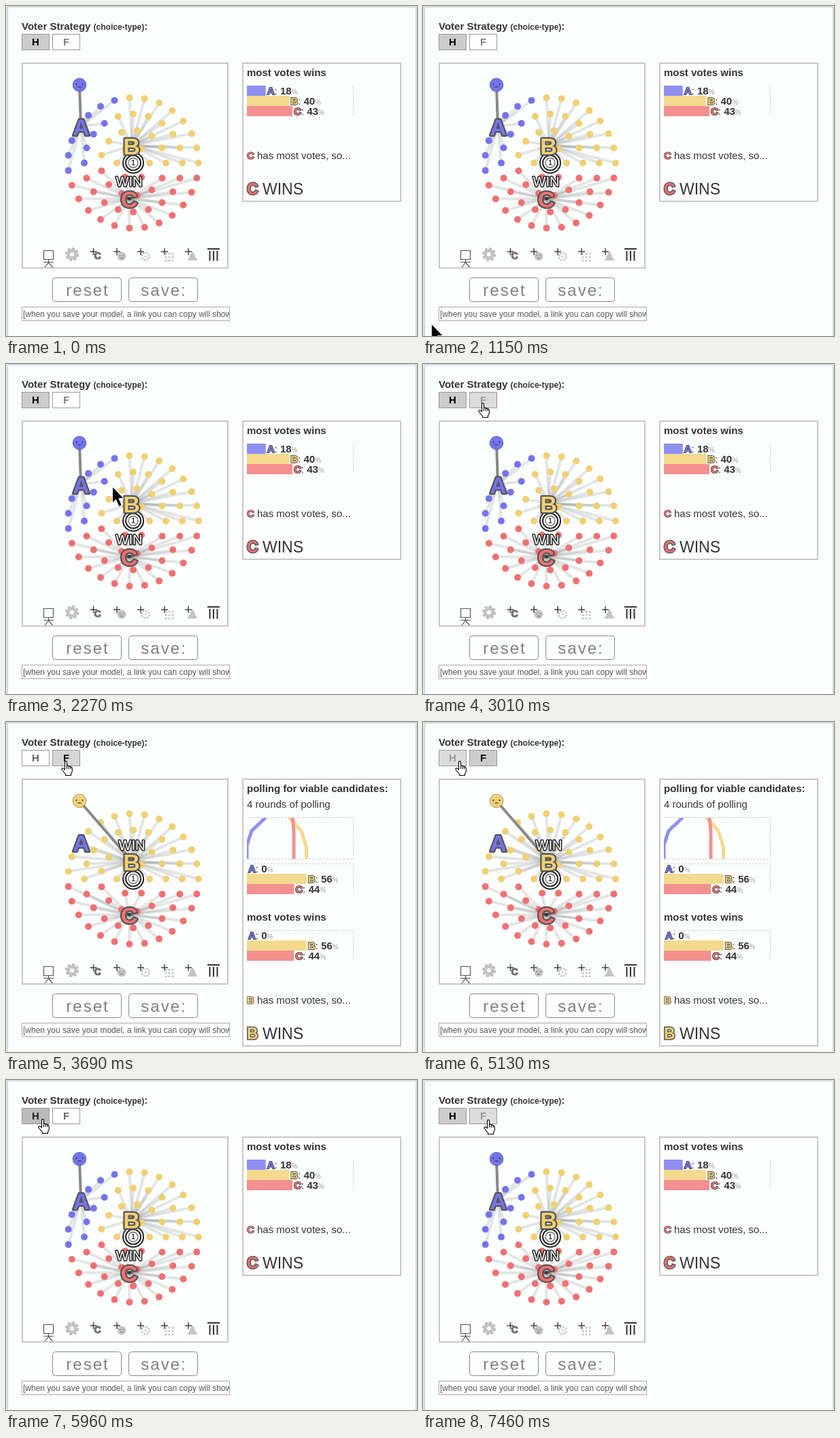
These frames come from a looping animation (604x485 px, 8000 ms). An HTML page:

```html
<!DOCTYPE html>
<html lang="en">
<head>
<meta charset="utf-8">
<title>Voter strategy</title>
<style>
  html, body { margin: 0; width: 100%; height: 100%; overflow: hidden; background: #e0eaea; }
  svg { display: block; width: 604px; height: 485px; }
  text { font-family: "Liberation Sans", Arial, sans-serif; white-space: pre; }
</style>
</head>
<body>
<svg id="stage" viewBox="0 0 604 485"></svg>
<script>
const LOOP = 8000;
const DOT = { A: '#7474ee', B: '#f0d073', C: '#f07172' };
const BAR = { A: '#8f8ff2', B: '#f3da8f', C: '#f49090' };
const SITE = { A: [110, 177], B: [185, 205], C: [181, 283] };
const FACE = [108, 116];

const line = (x1, y1, x2, y2, attrs) => `<path d="M${x1} ${y1}L${x2} ${y2}" ${attrs}/>`;
const circle = (x, y, r, attrs) => `<circle cx="${x}" cy="${y}" r="${r}" ${attrs}/>`;
const rect = (x, y, w, h, attrs) => `<rect x="${x}" y="${y}" width="${w}" height="${h}" ${attrs}/>`;
const text = (x, y, size, body, attrs = '') =>
  `<text x="${x}" y="${y}" font-size="${size}" fill="#333" ${attrs}>${body}</text>`;
const bold = 'font-weight="bold"';
const middle = 'text-anchor="middle"';
const dashes = d => `<path d="${d}" fill="none" stroke="#ccc" stroke-dasharray="3 2"/>`;
const frame = (x, y, w, h) => rect(x, y, w, h, 'fill="#fdffff" stroke="#c8c8c8" stroke-width="2"');

// Outlined candidate letter, used inside running text
const letter = (c, w) =>
  `<tspan font-weight="bold" fill="${DOT[c]}" stroke="#555" stroke-width="${w}" paint-order="stroke">${c}</tspan>`;

// Voters sit on four rings of 6, 13, 20 and 27 around one in the middle
function voters() {
  const list = [[187, 230.7]];
  for (let k = 1; k <= 4; k++) {
    const n = 7 * k - 1;
    for (let i = 0; i < n; i++) {
      const a = i * 2 * Math.PI / n;
      list.push([187 + 24 * k * Math.cos(a), 230.7 + 24 * k * Math.sin(a)]);
    }
  }
  return list;
}

function nearest([x, y], names) {
  const dist = c => Math.hypot(x - SITE[c][0], y - SITE[c][1]);
  return [...names].reduce((best, c) => dist(c) < dist(best) ? c : best);
}

function arena(names, faceVote, winX, winY) {
  const all = voters().map(p => [p, nearest(p, names)]);
  const rays = all.map(([p, c]) => line(...p, ...SITE[c], 'stroke="#000" stroke-opacity=".1" stroke-width="4"'));
  const dots = all.map(([p, c]) => circle(...p, 5, `fill="${DOT[c]}"`));
  const [fx, fy] = FACE;
  const face = line(fx, fy, ...SITE[faceVote], 'stroke="#888" stroke-width="4"')
    + circle(fx, fy, 10, `fill="${DOT[faceVote]}" stroke="#000" stroke-opacity=".3"`)
    + circle(fx - 4.5, fy - 1, 1.1, 'fill="#333"') + circle(fx + 4.5, fy - 1, 1.1, 'fill="#333"')
    + line(fx - 2.5, fy + 3, fx + 2.5, fy + 3, 'stroke="#333" stroke-width="1.2"');
  const ring = (r, w, col) => circle(187, 230.5, r, `fill="#fff" stroke="${col}" stroke-width="${w}"`);
  const target = ring(15, 2, '#222') + ring(11, 2, '#222') + ring(7, 1.3, '#666')
    + text(187, 234, 10, '1', `${bold} ${middle}`);
  const big = (c, x, y) => text(x, y, 34, letter(c, 4.5), `${middle} stroke-linejoin="round"`);
  const win = text(winX, winY, 20, 'WIN',
    `${middle} style="fill:#fff" stroke="#222" stroke-width="3" stroke-linejoin="round" paint-order="stroke"`);
  return rays.join('') + dots.join('') + face + target
    + big('A', 110.5, 190) + big('B', 184.5, 218) + big('C', 181, 296) + win;
}

// Horizontal tally, 157px for all 68 voters
function tally(top, counts) {
  return Object.entries(counts).map(([c, n], i) => {
    const w = n / 68 * 157, y = top + 15 * i;
    return rect(354, y, w, 15, `fill="${BAR[c]}"`)
      + text(356 + w, y + 13, 15, `${letter(c, 2)}: <tspan font-weight="bold">${Math.round(n / 68 * 100)}</tspan>`
        + '<tspan font-size="10" fill="#999">%</tspan>');
  }).join('');
}

const verdict = (c, y) => text(354, y, 15, `${letter(c, 1.6)} has most votes, so...`)
  + text(354, y + 52, 23, `${letter(c, 3)} WINS`);

function honest() {
  return frame(348, 84, 232, 203)
    + text(354, 103, 15, 'most votes wins', bold)
    + dashes('M510.5 117V162')
    + tally(117, { A: 12, B: 27, C: 29 })
    + verdict('C', 225)
    + arena('ABC', 'A', 181, 265);
}

function strategic() {
  const counts = { A: 0, B: 38, C: 30 };
  const poll = (c, d) => `<path d="${d}" fill="none" stroke="${BAR[c]}" stroke-width="5"/>`;
  return frame(348, 84, 232, 392)
    + text(354, 103, 15, 'polling for viable candidates:', bold)
    + text(354, 126, 15, '4 rounds of polling')
    + dashes('M354 140.5H510.5V201.5H354')
    + '<svg x="354" y="141" width="157" height="60" viewBox="354 141 157 60">'
    + poll('A', 'M382 140L361 160L354 181V202')
    + poll('B', 'M416 140L434 160L441.5 184V202')
    + poll('C', 'M421 140L423 160V202') + '</svg>'
    + dashes('M354 208.5H510.5V253') + tally(208, counts)
    + text(354, 292, 15, 'most votes wins', bold)
    + dashes('M354 306.5H510.5V351') + tally(306, counts)
    + verdict('B', 414)
    + arena('BC', 'B', 185, 188);
}

function toolbar() {
  const grey = 'fill="#c4c4c4"';
  const plus = x => `<path d="M${x - 5} 361H${x + 5}M${x} 356V366" stroke="#444" stroke-width="1.5"/>`;
  let s = '<path d="M55.5 359.5H69.5V372.5H55.5ZM62.5 372.5V377.5M55 376.5H70M62.5 377L57 384M62.5 377L68.5 384" fill="none" stroke="#555" stroke-width="1.2"/>';
  s += circle(97, 365, 8.5, 'fill="none" stroke="#b5b5b5" stroke-width="3" stroke-dasharray="3.8 2.875"')
    + circle(97, 365, 5.5, 'fill="none" stroke="#c4c4c4" stroke-width="5"');
  s += [128.5, 163, 198, 233, 268].map(plus).join('');
  s += text(134.5, 372, 14, 'C', `${bold} ${middle} stroke="#444" stroke-width="1" paint-order="stroke" style="fill:#777"`);
  s += circle(170, 368, 6.5, grey) + circle(167.5, 367, .8, 'fill="#666"') + circle(172.5, 367, .8, 'fill="#666"')
    + line(168, 370.5, 172, 370.5, 'stroke="#666"');
  s += circle(205, 368, 1.4, grey);
  for (let i = 0; i < 8; i++) {
    const a = i * Math.PI / 4 + .3;
    s += circle(205 + 5.5 * Math.cos(a), 368 + 5.5 * Math.sin(a), 1.5, grey);
  }
  for (let i = 0; i < 9; i++) s += circle(235 + i % 3 * 5, 364 + (i / 3 | 0) * 5, 1.6, grey);
  s += `<path d="M265 374C270 373 271 361 274 361S278 373 283 374Z" ${grey}/>`;
  s += '<path d="M296 357H314M299.5 360V374.5M305 360V374.5M310.5 360V374.5" stroke="#333" stroke-width="2"/>';
  return s;
}

function page() {
  const action = (x, label) => rect(x + .5, 399.5, 101, 35, 'rx="4" fill="#fdffff" stroke="#888"')
    + text(x + 52, 426, 24, label, `${middle} letter-spacing="2" style="fill:#808080"`);
  const choice = (id, x, w) => `<g id="${id}">` + rect(x + .5, 41.5, w, 23, 'stroke="#999"')
    + text(x + w / 2 + .5, 58, 15, id, `${bold} ${middle}`) + '</g>';
  return rect(2.5, 1.5, 600, 500, 'fill="#fcfefe" stroke="#c6cfcf"')
    + text(23, 35, 15, 'Voter Strategy <tspan font-size="12">(choice-type)</tspan>:', bold)
    + choice('H', 23, 40) + choice('F', 68, 40)
    + frame(24, 84, 302, 301)
    + `<g id="honest">${honest()}</g><g id="strategic">${strategic()}</g>`
    + toolbar()
    + action(68, 'reset') + action(180, 'save:')
    + rect(23.5, 442.5, 305, 20, 'fill="#fff" stroke="#aaa"')
    + '<svg x="24" y="443" width="304" height="19">'
    + text(1, 14, 12, '[when you save your model, a link you can copy will show up here]', 'style="fill:#555"') + '</svg>'
    + '<path id="arrow" d="M.5 .5V24L5.5 19L10 29.5L14 27.5L9.8 17.5H17Z" fill="#000" stroke="#fff" stroke-width=".8"/>'
    + '<path id="hand" d="M5.5 13V2.2Q5.5 .6 7 .6T8.5 2.2V8Q8.7 6.8 10 7T11.3 8.6Q11.6 7.6 12.8 7.9T14 9.6Q14.4 8.9 15.3 9.3T16.3 11V15Q16.3 17.5 14.5 19V21.5H6.5V19.5L1.2 13.5Q.2 12 1.4 11.2T3.6 11.4ZM8.5 8V12M11.3 8.6V12M14 9.6V12" fill="#fff" stroke="#000" stroke-width="1.1" stroke-linejoin="round"/>';
}

// Pointer steps: time, x, y
const arrowSteps = [
  [1000, 0, 475], [1150, 12, 467], [1270, 45, 446], [1390, 84, 417], [1510, 115, 393], [1630, 132, 378],
  [1750, 160, 350], [1870, 176, 327], [2010, 174, 272], [2130, 166, 225], [2260, 156, 180], [2390, 148, 148],
  [2530, 140, 131], [2650, 122, 105], [2770, 104, 82]
];
const handSteps = [
  [2890, 86, 62], [3010, 81, 57], [4620, 78, 60], [4740, 70, 65], [4860, 60, 62], [4980, 53, 57], [5130, 47, 57],
  [7050, 59, 57], [7190, 70, 58], [7310, 83, 59], [7460, 89, 58]
];
// Button looks: time, H fill, H text, F fill, F text
const looks = [
  [0, '#ccc', '#000', '#fff', '#808080'],
  [2890, '#ccc', '#000', '#ddd', '#999'],
  [3690, '#fff', '#666', '#d6d6d6', '#000'],
  [3840, '#fff', '#808080', '#d6d6d6', '#000'],
  [4740, '#fff', '#808080', '#ccc', '#000'],
  [4860, '#ddd', '#999', '#ccc', '#000'],
  [5960, '#bbb', '#222', '#fff', '#666'],
  [6110, '#bbb', '#000', '#fff', '#808080'],
  [7190, '#ccc', '#000', '#fff', '#808080'],
  [7310, '#ccc', '#000', '#ddd', '#999']
];

const $ = id => document.getElementById(id);
const show = (id, on) => $(id).setAttribute('display', on ? 'inline' : 'none');
const at = (steps, t) => steps.filter(s => s[0] <= t).pop();

function place(id, step) {
  show(id, step);
  if (step) $(id).setAttribute('transform', `translate(${step[1]} ${step[2]})`);
}

function paint(id, fill, ink) {
  const [box, label] = $(id).children;
  box.setAttribute('fill', fill);
  label.setAttribute('fill', ink);
}

function update(t) {
  const polled = t >= 3690 && t < 5960;
  show('honest', !polled);
  show('strategic', polled);
  const hand = at(handSteps, t);
  place('hand', hand);
  place('arrow', hand ? null : at(arrowSteps, t));
  const [, hFill, hInk, fFill, fInk] = at(looks, t);
  paint('H', hFill, hInk);
  paint('F', fFill, fInk);
}

$('stage').innerHTML = page();
const start = performance.now();
function tick() {
  update((performance.now() - start) % LOOP);
  requestAnimationFrame(tick);
}
tick();
</script>
</body>
</html>
```
